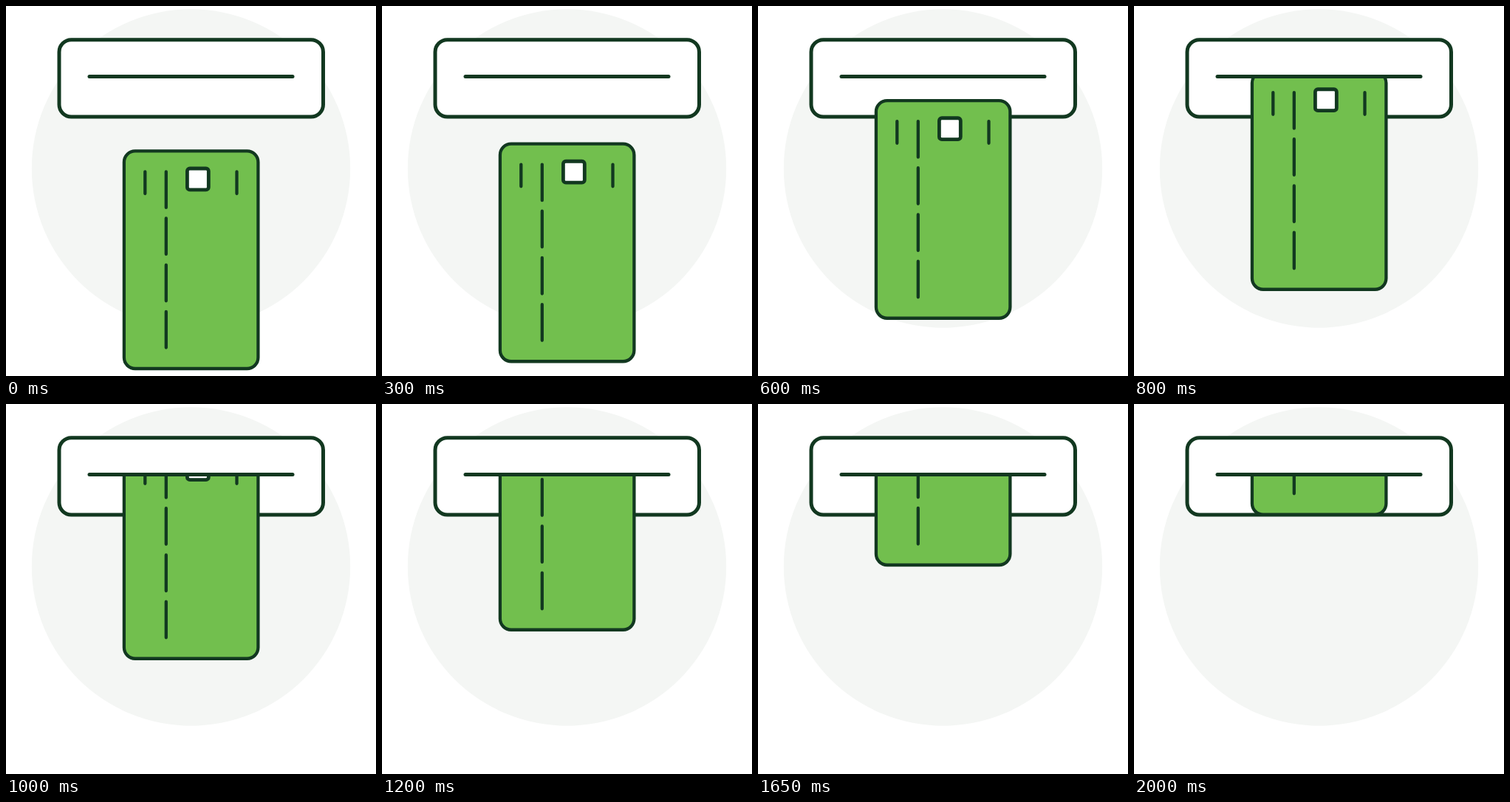
Recreate the animation shown at these times as an HTML page. Size 501 by 501 pixels, loop 2500 ms.

```html
<!DOCTYPE html>
<html lang="en">
<head>
<meta charset="utf-8">
<title>Card into slot</title>
<style>
  html, body { margin: 0; width: 100%; height: 100%; overflow: hidden; background: #fff; }
  svg { display: block; width: 100%; height: 100%; }
  .ink { stroke: #123820; stroke-linecap: round; }
</style>
</head>
<body>
<svg viewBox="0 0 501 501">
  <clipPath id="below"><rect y="95.5" width="501" height="406"/></clipPath>
  <circle cx="250.5" cy="220" r="215.7" fill="#f4f6f4"/>
  <rect class="ink" x="72" y="45.7" width="357.5" height="104.4" rx="16.5" fill="#fff" stroke-width="5"/>
  <g clip-path="url(#below)">
    <g id="card" class="ink" stroke-width="4.3">
      <rect x="159.9" y="196.4" width="181.5" height="294.6" rx="15" fill="#72bf4e"/>
      <path fill="none" d="M188.3 224.3v29.8M312.5 224.3v29.8
        M216.8 224.3v48.6m0 14.6v48.6m0 14.6v48.6m0 14.6v48.6"/>
      <rect x="245.4" y="220" width="28.9" height="28.9" rx="3.5" fill="#fff" stroke-width="4.8"/>
    </g>
  </g>
  <path class="ink" d="M113 95.6H388" stroke-width="5"/>
</svg>
<script>
  const LOOP = 2500, STEP = 50, HOLD_STEPS = 5, MOVES = 35, RISE = 9.75;
  const card = document.getElementById('card');

  function draw() {
    const t = performance.now() % LOOP;
    const moves = Math.min(MOVES, Math.max(0, Math.floor(t / STEP) - HOLD_STEPS));
    card.setAttribute('transform', `translate(0 ${-moves * RISE})`);
    requestAnimationFrame(draw);
  }
  draw();
</script>
</body>
</html>
```
